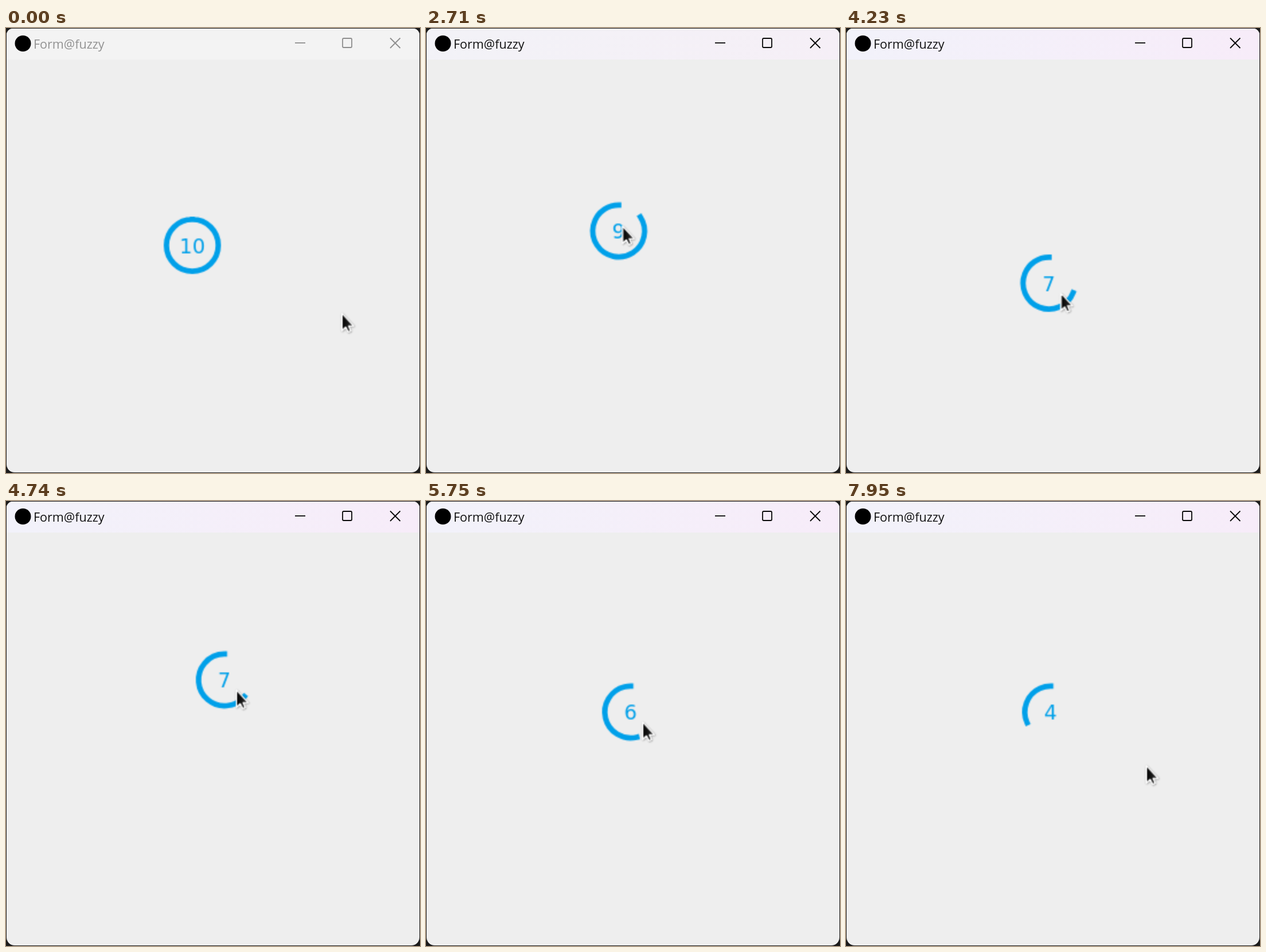
An HTML page with a canvas for the animation above (8000 ms loop, 722 by 776 pixels).

```html
<!DOCTYPE html>
<html lang="en">
<head>
<meta charset="utf-8">
<title>Countdown ring</title>
<style>
  html, body { margin: 0; width: 100%; height: 100%; overflow: hidden; background: #1b1b1b; }
  canvas { display: block; }
</style>
</head>
<body>
<canvas id="stage" width="722" height="776"></canvas>
<script>
const W = 722, H = 776, TITLE = 55;
const LOOP = 8000, COUNT = 10000;
const COUNT_START = 1130, ACTIVE_AT = 2300;
const BLUE = '#00a0e9';

const ctx = document.getElementById('stage').getContext('2d');

// The form is painted at half size and scaled up, which softens its edges
const layer = document.createElement('canvas');
layer.width = 360;
layer.height = 360;
const form = layer.getContext('2d');

const clamp01 = v => Math.min(1, Math.max(0, v));
const smooth = u => u * u * (3 - 2 * u);

// Pointer glides one after another; bend bows the way sideways
const HOME = [586, 498];
const glides = [
  { from: 600, to: 1290, end: [307, 381] },
  { from: 1400, to: 2250, end: [332, 371] },
  { from: 2595, to: 3030, end: [370, 227], bend: 8 },
  { from: 3080, to: 3630, end: [379, 319], bend: -35 },
  { from: 3630, to: 3900, end: [384, 253] },
  { from: 3930, to: 4330, end: [373, 501] },
  { from: 4330, to: 4740, end: [402, 330] },
  { from: 4800, to: 5350, end: [378, 386], bend: -20 },
  { from: 5780, to: 6400, end: [524, 462] }
];

// While dragged, the ring keeps its distance to the pointer
const drags = [
  { from: 2300, to: 3030, dx: -7, dy: 8 },
  { from: 3905, to: 5400, dx: -21, dy: -18 }
];

function pointer(t) {
  let [x, y] = HOME;
  for (const { from, to, end, bend = 0 } of glides) {
    if (t < from) break;
    const s = smooth(clamp01((t - from) / (to - from)));
    x += (end[0] - x) * s + 4 * bend * s * (1 - s);
    y += (end[1] - y) * s;
  }
  return [Math.round(x), Math.round(y)];
}

function ringCentre(t) {
  let centre = [325, 379];
  for (const { from, to, dx, dy } of drags) {
    if (t < from) break;
    const [x, y] = pointer(Math.min(t, to));
    centre = [x + dx, y + dy];
  }
  return centre;
}

function line(x1, y1, x2, y2) {
  ctx.beginPath();
  ctx.moveTo(x1, y1);
  ctx.lineTo(x2, y2);
  ctx.stroke();
}

function drawButtons(color) {
  ctx.strokeStyle = color;
  ctx.lineWidth = 1.8;
  line(504, 26, 522, 26);
  line(670, 17.5, 687.5, 35);
  line(687.5, 17.5, 670, 35);
  ctx.beginPath();
  ctx.roundRect(587, 18, 16, 16, 2);
  ctx.stroke();
}

function drawWindow(t) {
  const active = t >= ACTIVE_AT;
  ctx.fillStyle = '#1b1b1b';
  ctx.fillRect(0, 0, W, H);

  ctx.save();
  ctx.beginPath();
  ctx.roundRect(1, 1, W - 2, H - 2, [11, 11, 14, 14]);
  ctx.clip();
  ctx.fillStyle = '#eeeeee';
  ctx.fillRect(0, 0, W, H);
  ctx.fillStyle = '#f3f3f3';
  ctx.fillRect(0, 0, W, TITLE);
  const tint = ctx.createLinearGradient(0, 0, W, 0);
  tint.addColorStop(0, '#f2f2fa');
  tint.addColorStop(1, '#f7ecf9');
  ctx.globalAlpha = clamp01((t - ACTIVE_AT) / 700);
  ctx.fillStyle = tint;
  ctx.fillRect(0, 0, W, TITLE);
  ctx.restore();

  ctx.fillStyle = '#000';
  ctx.beginPath();
  ctx.arc(29.5, 27, 14, 0, 2 * Math.PI);
  ctx.fill();

  ctx.fillStyle = active ? '#111' : '#929292';
  ctx.font = '21.5px "Open Sans", "Noto Sans", sans-serif';
  ctx.fillText('Form@fuzzy', 48, 36);
  drawButtons(active ? '#080808' : '#8e8e8e');
}

function drawRing(t) {
  const [x, y] = ringCentre(t);
  const elapsed = Math.max(0, t - COUNT_START);
  const gap = elapsed / COUNT * 2 * Math.PI;
  form.save();
  form.translate((x - 1) / 2, (y - TITLE) / 2);
  form.strokeStyle = form.fillStyle = BLUE;
  form.lineWidth = 4.7;
  form.lineCap = 'square';
  form.beginPath();
  form.arc(0, 0, 22.6, gap - Math.PI / 2, Math.PI * 1.5);
  form.stroke();
  form.font = '17.7px "DejaVu Sans", sans-serif';
  form.textAlign = 'center';
  form.fillText(10 - Math.floor(elapsed / 1000), 0, 6.5);
  form.restore();
}

const arrow = new Path2D('M0 0V29.5L6.5 23.5L11 32L15 30L11.5 21.5H20Z');

function drawPointer(t) {
  const [x, y] = pointer(t);
  const shade = form.createLinearGradient(0, 0, 20, 0);
  shade.addColorStop(0, '#000');
  shade.addColorStop(1, '#333');
  form.save();
  form.translate((x - 1) / 2, (y - TITLE) / 2);
  form.scale(0.5, 0.5);
  form.lineJoin = 'round';
  form.lineWidth = 2.2;
  form.strokeStyle = '#fff';
  form.fillStyle = shade;
  form.shadowColor = 'rgba(0,0,0,0.5)';
  form.shadowBlur = 1.5;
  form.shadowOffsetX = form.shadowOffsetY = 0.5;
  form.stroke(arrow);
  form.shadowColor = 'transparent';
  form.fill(arrow);
  form.stroke(arrow);
  form.restore();
}

const start = performance.now();
function frame() {
  const t = (performance.now() - start) % LOOP;
  form.clearRect(0, 0, layer.width, layer.height);
  drawRing(t);
  drawPointer(t);
  drawWindow(t);
  ctx.drawImage(layer, 1, TITLE, 720, 720);
  requestAnimationFrame(frame);
}
frame();
</script>
</body>
</html>
```
